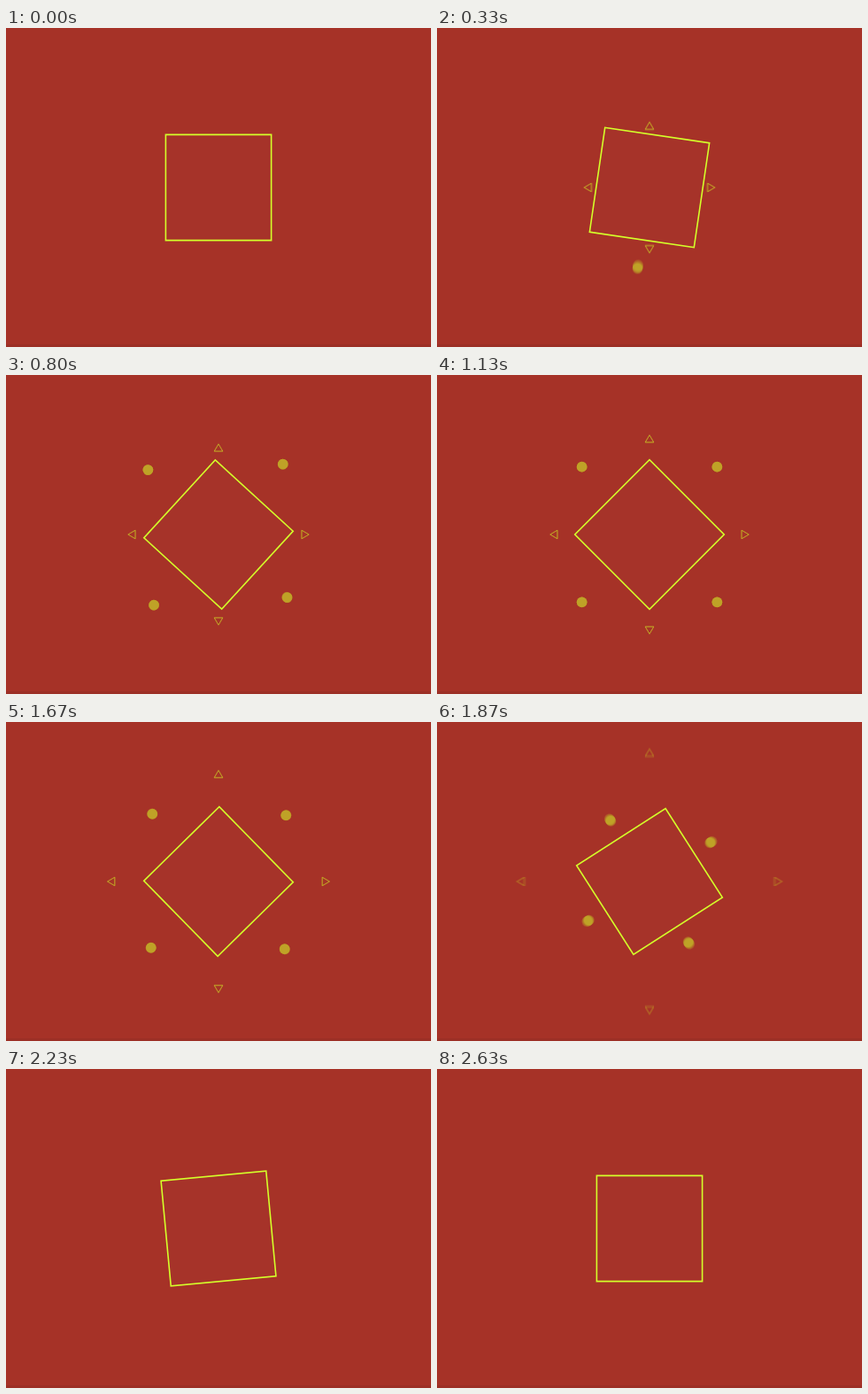
Write an HTML page with a canvas that moves like this. It is 480 by 360 pixels and loops after 2.71 s.

```html
<!DOCTYPE html>
<html lang="en">
<head>
<meta charset="utf-8">
<title>Turning square</title>
<style>
  html, body { margin: 0; width: 100%; height: 100%; overflow: hidden; background: #a63329; }
  canvas { display: block; }
</style>
</head>
<body>
<canvas width="480" height="360"></canvas>
<script>
const ctx = document.querySelector('canvas').getContext('2d');
const LOOP = 2710, STEP = 100 / 3, SHUTTER = 16, SAMPLES = 9;
const RED = '#a63329', LIME = '#d4ff2a';
const QUARTER = Math.PI / 2;

const clamp = x => Math.min(1, Math.max(0, x));

// Cubic bezier (.36, 0, .28, 1), solved by bisection
function ease(u) {
  u = clamp(u);
  let low = 0, high = 1, s = 0.5;
  for (let i = 0; i < 24; i++) {
    s = (low + high) / 2;
    const x = 1.08 * s * (1 - s) ** 2 + 0.84 * s * s * (1 - s) + s ** 3;
    if (x < u) low = s; else high = s;
  }
  return s * s * (3 - 2 * s);
}

const turnIn = t => ease((t - 130) / 910);
const turnOut = t => ease((t - 1600) / 1000);
const squareAngle = t => QUARTER / 2 * (turnIn(t) + turnOut(t));

// Dots pop out one after another, then all return together
function dotDistance(t, i) {
  const age = Math.max(0, t - 227 - 121 * i);
  return 108 * (1 - Math.exp(-0.0172 * age)) - 93 * turnOut(t);
}

// Triangles slow down to a drift, then speed away
function triangleDistance(t) {
  const drift = 109.2 + 0.0215 * (t - 1130);
  const settle = 11.1 * Math.exp(-0.0036 * (t - 530));
  return drift - settle + 0.00035 * Math.max(0, t - 1625) ** 2;
}

function rotated(angle, paint) {
  ctx.save();
  ctx.rotate(angle);
  paint();
  ctx.restore();
}

function paintParticles(t, angle, alpha) {
  ctx.globalAlpha = alpha;
  ctx.fillStyle = RED;
  ctx.fillRect(-240, -180, 480, 360);
  ctx.fillStyle = ctx.strokeStyle = LIME;
  for (let i = 0; i < 4; i++) {
    rotated(angle + (i + 1) * QUARTER, () => {
      ctx.beginPath();
      ctx.arc(dotDistance(t, i), 0, 5.9, 0, 7);
      ctx.fill();
    });
  }
  const visible = clamp((1980 - t) / 200);
  if (!visible) return;
  ctx.globalAlpha = alpha * visible;
  ctx.lineWidth = 0.9;
  const d = triangleDistance(t);
  for (let i = 0; i < 4; i++) {
    rotated(i * QUARTER, () => {
      ctx.beginPath();
      ctx.moveTo(d + 4.2, 0);
      ctx.lineTo(d - 4, 4.8);
      ctx.lineTo(d - 4, -4.8);
      ctx.closePath();
      ctx.stroke();
    });
  }
}

function draw(t) {
  const angle = squareAngle(t);
  ctx.setTransform(1, 0, 0, 1, 240, 180);
  // Running average over the shutter gives the motion blur
  for (let n = 0; n < SAMPLES; n++) {
    paintParticles(t + SHUTTER * (n / (SAMPLES - 1) - 0.5), angle, 1 / (n + 1));
  }
  ctx.globalAlpha = 1;
  ctx.fillStyle = RED;
  ctx.strokeStyle = LIME;
  ctx.lineWidth = 1.6;
  rotated(angle, () => {
    ctx.beginPath();
    ctx.rect(-59.6, -59.6, 119.2, 119.2);
    ctx.fill();
    ctx.stroke();
  });
  ctx.fillStyle = 'rgba(0, 0, 0, .06)';
  ctx.fillRect(-240, 177, 480, 3);
}

function frame(now) {
  draw(Math.floor((now % LOOP + 5) / STEP) * STEP);
  requestAnimationFrame(frame);
}
requestAnimationFrame(frame);
</script>
</body>
</html>
```
